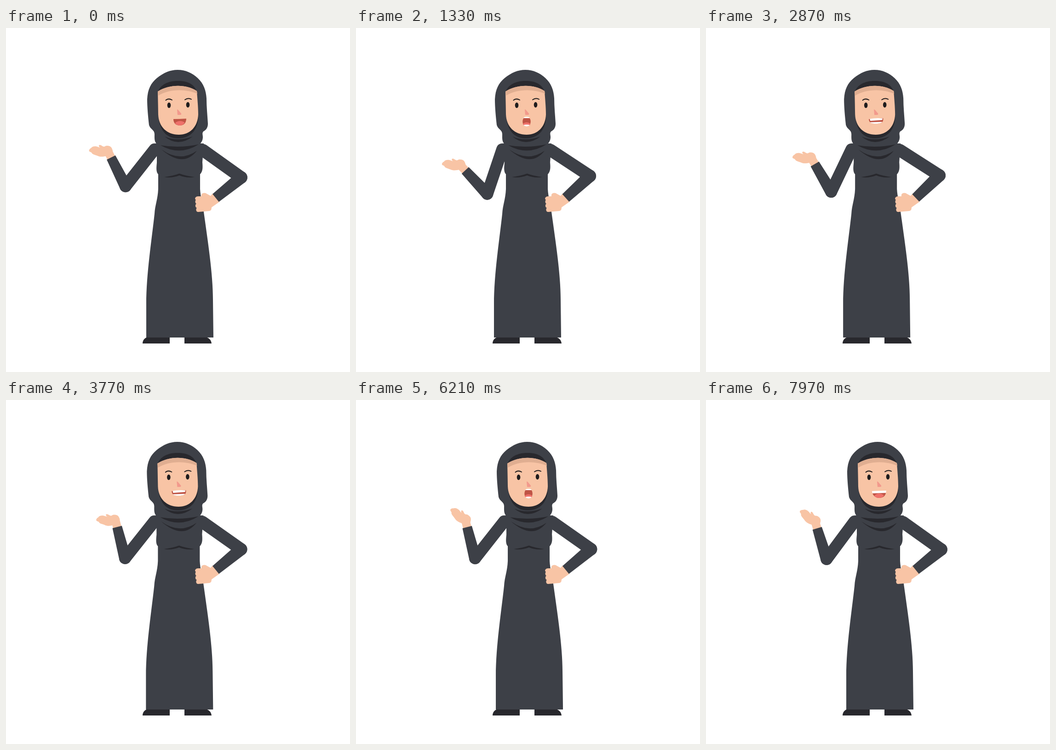
Animation of 748x748 px, one loop 8000 ms. Source, as an HTML page with a canvas:

```html
<!DOCTYPE html>
<html lang="en">
<head>
<meta charset="utf-8">
<title>Talking woman</title>
<style>
html, body { margin: 0; height: 100%; overflow: hidden; background: #fff; }
canvas { display: block; width: 100vw; height: 100vh; }
</style>
</head>
<body>
<canvas id="stage" width="748" height="748"></canvas>
<script>
const ctx = document.getElementById('stage').getContext('2d');
const LOOP = 8000, SWAY = 2000, RAD = Math.PI / 180;
const CLOTH = '#3d4047', DARK = '#28282d', SKIN = '#f8c4a5', SHADE = '#e0ae91',
  RED = '#bf5445', TONGUE = '#ee716a', WHITE = '#fff', INK = '#1f1c1d', NOSE = '#f2998c';

const shape = (color, d) => ({ color, path: new Path2D(d) });

const shoes = [
  shape(DARK, 'M297 686 C297 678 303 672 311 672 L356 672 V686 Z'),
  shape(DARK, 'M388 672 H433 C441 673 446 678 447 686 H388 Z')
];

const body = [
  shape(CLOTH, `M323 251 H430 L427 292 C428 304 428 312 422 318 L422 350 C423 368 427 378 430 400
    C439 465 450 535 450 590 L451 673 H305 V600 C305 535 317 460 323 404 C324 385 330 373 331 350
    L331 318 C326 313 327 303 328 293 L328 270 Z`),
  shape(CLOTH, `M373 91 C391 91 405 98 417 109 C430 121 435 136 436 153 C436 172 438 190 439 208
    C439 217 435 222 429 225 C426 229 428 232 428 237 C428 243 426 248 421 253 H329
    C322 248 323 239 323 231 C323 221 314 221 311 211 C309 193 307 172 307 155
    C308 133 315 120 328 109 C343 97 357 91 373 91 Z`),
  shape(DARK, `M330 139 C336 123 353 115 373 115 C395 115 409 122 415 138 L418 194
    C417 224 399 240 374 240 C350 240 332 224 331 184 Z`),
  shape(SKIN, `M330 138 C356 122 391 122 415 137 C416 152 418 172 418 188 C417 215 400 232 376 232
    C350 232 332 215 331 188 Z`),
  shape(SHADE, 'M330 138 C356 122 391 122 415 137 L416 143 C391 132 356 132 331 147 Z'),
  shape(DARK, 'M345 236 Q372 248 406 236 Q374 260 345 236 Z'),
  shape(DARK, 'M336 255 Q378 262 419 253 Q378 279 336 255 Z'),
  shape(DARK, 'M338 264 Q378 293 415 267 Q385 305 338 264 Z'),
  shape(DARK, 'M344 324 Q362 322 377 316.5 Q392 322 410 324 Q393 327 377 320.5 Q360 327 344 324 Z'),
  shape(NOSE, 'M372 177 Q374 177 376 180 L381 186 Q382 189 378 189 L373 189 Z'),
  shape(INK, 'M350.7 168 a3.8 6 0 1 0 7.6 0 a3.8 6 0 1 0 -7.6 0 Z'),
  shape(INK, 'M391.7 167 a3.8 6 0 1 0 7.6 0 a3.8 6 0 1 0 -7.6 0 Z')
];
const brows = new Path2D('M347.5 157 Q353 152 361 156.5 M389 156 Q396 151 403 155');

const mouths = {
  a: [ // open smile
    shape(RED, 'M364 198 Q378 198 392 197 C392 207 386 212 378 212 C370 212 364 207 364 198 Z'),
    shape(TONGUE, 'M367.5 207 C372 201 384 201 388.5 206 C386 210 382 212 378 212 C374 212 370 210 367.5 207 Z')
  ],
  b: [ // smile with upper teeth
    shape(RED, 'M362 202 L391 201 C391 208 385 213 377 213 C369 213 363 208 362 202 Z'),
    shape(TONGUE, 'M366 209 C370 202 382 202 387 208 C384 211 381 213 377 213 C373 213 369 212 366 209 Z'),
    shape(WHITE, 'M361 198 L392 197 L391 202 L362 203 Z')
  ],
  c: [ // both rows of teeth
    shape(RED, 'M361 198 L392 196 C393 204 390 208 377 208 C365 208 361 205 361 198 Z'),
    shape(WHITE, 'M363 197.5 Q377 195 391 196.5 L390 200 L364 202 Z'),
    shape(WHITE, 'M363 205 L390 204 C388 207 384 208 377 208 C370 208 366 207.5 363 205 Z')
  ],
  o: [ // rounded
    shape(RED, 'M370 195 Q376 192 382 195 C386 201 385 206 383 211 Q376 215 369 211 C367 206 366 201 370 195 Z'),
    shape(TONGUE, 'M368 209 C370 204 382 204 384 209 L382 212 H370 Z'),
    shape(WHITE, 'M369 196 Q370 193 376 193 Q382 193 383 196 Z'),
    shape(WHITE, 'M369 211 Q376 209 383 211 Q380 214 376 214 Q372 214 369 211 Z')
  ]
};
const SPEECH = 'aabacboabcbaobcabocbaocaobcabcaobacboacb';

const fist = shape(SKIN, `M449 360 L464 378 L447 390 Q447 398 441 398 L418 400 C412 400 413 392 415 391
  C411 390 411 384 414 382 C411 381 411 375 413 374 C409 371 412 366 418 366 L425 366
  C424 360 428 358 434 359 L445 365 Z`);
const openHand = shape(SKIN, `M9 -4 C7 -13 3 -15 -4 -15 C-7 -15 -8 -13 -10 -13 C-14 -13 -16 -17 -20 -16.5
  C-23 -15 -20 -12 -18 -11 L-22 -12 C-28 -15 -36 -14 -38 -10 C-42 -8 -44 -4 -41 -2
  C-39 -1 -38 -1 -37 0 C-36 4 -28 5 -24 7 C-18 10 -10 9 -4 7 L4 7 Z`);

// time, upper arm angle, forearm angle, palm turn
const gesture = [
  [0, 38.2, 26.7, 0], [600, 18, 41.5, 1], [1000, 18, 41.5, 1], [2000, 20.6, 48.5, 0],
  [2500, 19, 42, 0], [3400, 37, 10.5, 0], [3770, 38.4, 14.3, -1], [4150, 38.4, 14.3, 0],
  [4800, 59, 12.8, 45], [5200, 59, 12.8, 45], [5800, 38.2, 14.3, 33], [6210, 38.2, 14.3, 33],
  [7000, 36, 10, 32], [7970, 36.6, 17, 31.5], [8000, 36.6, 17, 31.5]
];

function pose(t) {
  const i = gesture.findIndex(k => k[0] > t);
  const from = gesture[i - 1], to = gesture[i];
  const p = (1 - Math.cos(Math.PI * (t - from[0]) / (to[0] - from[0]))) / 2;
  return from.slice(1).map((v, j) => (v + (to[j + 1] - v) * p) * RAD);
}

function paint(parts) {
  for (const { color, path } of parts) {
    ctx.fillStyle = color;
    ctx.fill(path);
  }
}

function line(a, b, width, color) {
  ctx.lineWidth = width;
  ctx.strokeStyle = color;
  ctx.beginPath();
  ctx.moveTo(a.x, a.y);
  ctx.lineTo(b.x, b.y);
  ctx.stroke();
}

// Sleeve that is round at the elbow and cut straight at the cuff
function forearm(elbow, cuff, r1, r2) {
  const angle = Math.atan2(cuff.y - elbow.y, cuff.x - elbow.x);
  const length = Math.hypot(cuff.x - elbow.x, cuff.y - elbow.y);
  ctx.save();
  ctx.translate(elbow.x, elbow.y);
  ctx.rotate(angle);
  ctx.fillStyle = CLOTH;
  ctx.beginPath();
  ctx.arc(0, 0, r1, Math.PI / 2, -Math.PI / 2);
  ctx.lineTo(length, -r2);
  ctx.lineTo(length, r2);
  ctx.fill();
  ctx.restore();
}

function raisedArm(t, sway) {
  const [upper, lower, turn] = pose(t);
  const shoulder = { x: 323 + sway, y: 264 };
  const elbow = { x: shoulder.x - 102 * Math.sin(upper), y: shoulder.y + 102 * Math.cos(upper) };
  const along = d => ({ x: elbow.x - d * Math.sin(lower), y: elbow.y - d * Math.cos(lower) });
  const cuff = along(70), wrist = along(82);
  line(cuff, wrist, 18.5, SKIN);
  ctx.save();
  ctx.translate(wrist.x, wrist.y);
  ctx.rotate(turn);
  paint([openHand]);
  ctx.restore();
  line(shoulder, elbow, 26, CLOTH);
  forearm(elbow, cuff, 13, 10.5);
}

// The wrist rests on the hip, so the elbow follows from the two bone lengths
function hipArm(sway) {
  const shoulder = { x: 428 + sway, y: 265.5 }, wrist = { x: 456, y: 369.5 };
  const upper = 102.4, lower = 71;
  const dx = wrist.x - shoulder.x, dy = wrist.y - shoulder.y, d = Math.hypot(dx, dy);
  const a = (upper ** 2 - lower ** 2 + d ** 2) / (2 * d);
  const h = Math.sqrt(upper ** 2 - a ** 2);
  const elbow = { x: shoulder.x + (a * dx + h * dy) / d, y: shoulder.y + (a * dy - h * dx) / d };
  paint([fist]);
  line(shoulder, elbow, 27, CLOTH);
  forearm(elbow, wrist, 13.5, 11);
}

function draw(t) {
  const sway = -3.5 * (1 - Math.cos(2 * Math.PI * (t + 30) / SWAY));
  ctx.fillStyle = WHITE;
  ctx.fillRect(0, 0, 748, 748);
  ctx.lineCap = 'round';
  paint(shoes);
  raisedArm(t, sway);
  ctx.save();
  ctx.translate(sway, 0);
  paint(body);
  ctx.lineWidth = 2;
  ctx.strokeStyle = INK;
  ctx.stroke(brows);
  paint(mouths[SPEECH[Math.floor(t / 200)]]);
  ctx.restore();
  hipArm(sway);
}

const start = performance.now();
function tick() {
  draw((performance.now() - start) % LOOP);
  requestAnimationFrame(tick);
}
tick();
</script>
</body>
</html>
```
